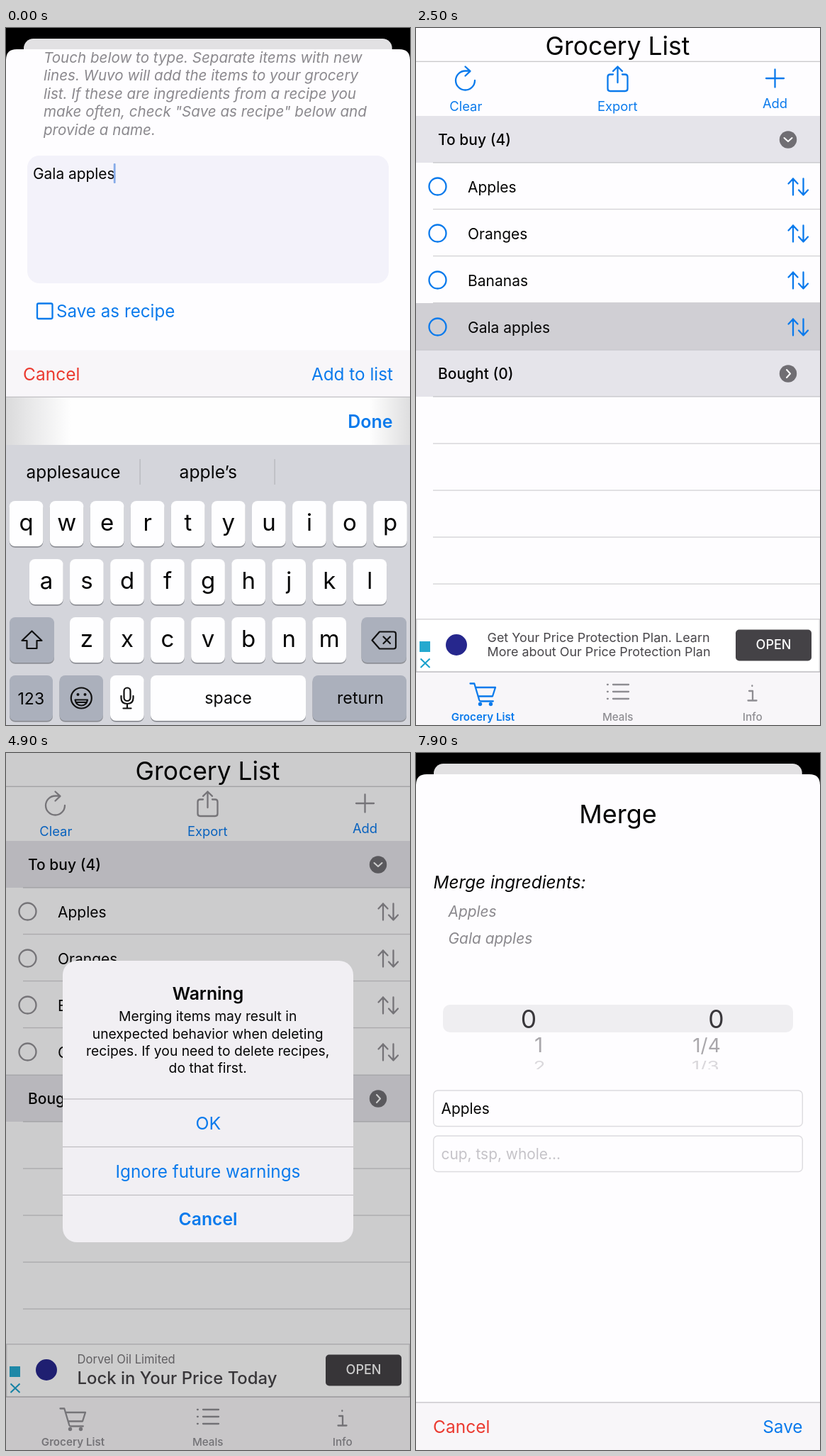
Animation of 570x983 px, one loop 8 s. Source, as an HTML page:

```html
<!DOCTYPE html>
<html lang="en">
<head>
<meta charset="utf-8">
<title>Grocery list</title>
<style>
html, body { margin: 0; width: 100%; height: 100%; overflow: hidden; background: #000; }
svg { display: block; width: 100vw; height: 100vh; font-family: Inter, "Liberation Sans", sans-serif; --tint: #0a7aec; }
text { white-space: pre; }
.ico { fill: none; stroke: var(--tint); stroke-width: 2.3; stroke-linecap: round; stroke-linejoin: round; }
.gray { stroke: #8e8d92; }
.white { stroke: #fff; stroke-width: 2; }
.key { stroke: #111; stroke-width: 2.2; }
</style>
</head>
<body>
<svg id="stage" viewBox="0 0 570 983"></svg>
<script>
const LOOP = 8000, STEP = 100;
const BLUE = '#0a7aec', RED = '#eb3a30', PAPER = '#fefdff', BAR = '#f8f6f9', LINE = '#d3d2d5';

// Markup helpers
const text = (s, x, y, size, fill = '#050505', opt = '') =>
  `<text x="${x}" y="${y}" font-size="${size}" fill="${fill}" ${opt}>${s}</text>`;
const mid = (s, x, y, size, fill, opt = '') => text(s, x, y, size, fill, `text-anchor="middle" ${opt}`);
const right = (s, x, y, size, fill, opt = '') => text(s, x, y, size, fill, `text-anchor="end" ${opt}`);
const rect = (x, y, w, h, fill, r = 0, opt = '') =>
  `<rect x="${x}" y="${y}" width="${w}" height="${h}" fill="${fill}" rx="${r}" ${opt}/>`;
const icon = (d, cls = '') => `<path class="ico ${cls}" d="${d}"/>`;
const group = (id, body, opt = '') => `<g id="${id}" ${opt}>${body}</g>`;
const MEDIUM = 'font-weight="500"', BOLD = 'font-weight="600"', ITALIC = 'font-style="italic"';

// Grocery list screen
const rowBody = (name, y) =>
  `<circle class="ico" cx="30.5" cy="${y}" r="12"/>` +
  text(name, 73, y + 8, 21) +
  icon(`M532 ${y + 12}v-23m-6.5 7l6.5-7 6.5 7M546.5 ${y - 11}v23m-6.5-7l6.5 7 6.5-7`);

const section = (name, y, chevron) =>
  rect(0, y, 570, 66, '#e5e4ea') + rect(24, y + 65.3, 546, 1.2, '#c4c3c8') +
  text(name, 31, y + 41, 21, '#050505', MEDIUM) +
  `<circle cx="525" cy="${y + 33.5}" r="12.2" fill="#706e73"/>` + icon(chevron, 'white');

const toolbar =
  rect(0, 46.6, 570, 1.4, '#cbcacd') +
  mid('Grocery List', 284.5, 38, 35.4) +
  icon('M83 74A13.5 13.5 0 1 1 69.5 60.5H76M69.5 54.5l7 6.3-7 6.7') +
  icon('M278 65.5h-4q-3.5 0-3.5 3.5v16.5q0 3.5 3.5 3.5h21q3.5 0 3.5-3.5V69q0-3.500-3.5-3.5h-4M284.5 77V54.500m-6.5 6.3l6.5-6.3 6.5 6.3') +
  icon('M506.5 58.5v25M494 71h25') +
  mid('Clear', 70.3, 117, 18.4, BLUE) + mid('Export', 284.3, 117, 18.4, BLUE) + mid('Add', 506.5, 112.5, 18.4, BLUE);

const ad =
  rect(0, 833, 570, 75, '#fff') +
  '<path d="M.7 908V833.7H569.3V908" fill="none" stroke="#d6d5d8" stroke-width="1.4"/>' +
  rect(5, 865, 15, 15, '#25a9cf') +
  '<path d="M6.5 889.5l13 12.5m0-12.5l-13 12.5" stroke="#18a0cc" stroke-width="2" fill="none"/>' +
  '<circle cx="57" cy="870" r="15" fill="#26278d"/>' +
  `<g clip-path="url(#adClip)">${
    group('adA', text('Get Your Price Protection Plan. Learn', 100.5, 866, 17.95, '#48464a') +
      text('More about Our Price Protection Plan', 100.5, 886, 17.95, '#48464a'))}${
    group('adB', text('Dorvel Oil Limited', 100.5, 861, 16.6, '#777579') +
      text('Lock in Your Price Today', 100.5, 890, 23.9, '#454347', MEDIUM))}</g>` +
  rect(451, 848.5, 107, 44, '#444246', 5) + mid('OPEN', 504.5, 876, 18, '#fff', MEDIUM);

const tabs =
  rect(0, 908, 570, 75, BAR) + rect(0, 907.4, 570, 1.3, '#b5b4b8') +
  icon('M76.5 924.5h5.8l7 23.5q.5 1.5 2 1.5h17.5M84 930h28l-4 12.5H87.5') +
  '<g fill="var(--tint)"><circle cx="90.5" cy="953.5" r="2.7"/><circle cx="105.5" cy="953.5" r="2.7"/></g>' +
  icon('M278 926h22M278 936h22M278 946h22M270 926h.8M270 936h.8M270 946h.8', 'gray') +
  icon('M470 935h5v13M468.5 948.5h12M474.3 927.5v.5', 'gray') +
  mid('Grocery List', 94.5, 977, 15.2, 'var(--tint)', BOLD) +
  mid('Meals', 284.7, 977, 15.2, '#8e8d92', MEDIUM) + mid('Info', 474.7, 977, 15.2, '#8e8d92', MEDIUM);

const separators = [255.5, 321.5, 387.5, 586, 652, 718, 784]
  .map(y => rect(24, y - .6, 546, 1.3, LINE)).join('');

const preview = group('drag',
  rect(0, 364, 570, 22, 'url(#shadowUp)') + rect(0, 455, 570, 26, 'url(#shadowDown)') +
  rect(0, 387, 570, 68, '#f5f3f7', 0, 'opacity=".84"') + rect(0, 386.5, 570, 4, '#fff') +
  rect(0, 453.4, 570, 2, '#929195') +
  `<g opacity=".86">${rowBody('Gala apples', 421.5)}</g>`);

const list =
  toolbar + separators +
  section('To buy (4)', 124, 'M519.5 155l5.5 5 5.5-5') +
  rowBody('Apples', 223.5) + rowBody('Oranges', 289.5) + rowBody('Bananas', 355.5) +
  rect(0, 388, 570, 66, '#d0cfd4', 0, 'id="press"') +
  group('lifted', rowBody('Gala apples', 421.5)) +
  section('Bought (0)', 454, 'M523 482l5 5.5-5 5.5') + rect(0, 453.6, 570, 1, '#c4c3c8') +
  preview + ad + tabs;

// Warning dialog
const message = ['Merging items may result in', 'unexpected behavior when deleting',
  'recipes. If you need to delete recipes,', 'do that first.'];
const dialog =
  rect(80, 293, 410, 397, '#f1eff3', 20) + rect(80, 488.5, 410, 67, '#dddbe0', 0, 'id="okPress"') +
  mid('Warning', 285, 347.5, 24.8, '#050505', BOLD) +
  message.map((s, i) => mid(s, 284.7, 378.3 + i * 24.3, 19.3)).join('') +
  [488, 555.5, 623.5].map(y => rect(80, y - .6, 410, 1.2, '#bebcc1')).join('') +
  mid('OK', 285.3, 531, 24.8, BLUE) + mid('Ignore future warnings', 285, 598.5, 24.3, BLUE) +
  mid('Cancel', 285, 666, 24.7, BLUE, BOLD);

// Sheets
const sheetBase = `<path d="M0 45Q0 30 15 30H555Q570 30 570 45V1000H0z" fill="${PAPER}"/>`;
const hint = ['Touch below to type. Separate items with new', 'lines. Wuvo will add the items to your grocery',
  'list. If these are ingredients from a recipe you', 'make often, check "Save as recipe" below and', 'provide a name.'];
const addSheet = sheetBase +
  group('form', hint.map((s, i) => text(s, 53, 49 + i * 25.4, 20.6, '#8b898e', ITALIC)).join('') +
    rect(30, 180, 510, 180, '#f3f2fa', 17) + text('Gala apples', 38, 213, 20.9) +
    rect(151.8, 191, 2.8, 28, '#86abe8', 1, 'id="caret"') +
    icon('M46 388.5h17.5q2 0 2 2v17.5q0 2-2 2H46q-2 0-2-2v-17.5q0-2 2-2z') +
    text('Save as recipe', 71, 408, 24.2, BLUE)) +
  rect(0, 454.5, 570, 66, BAR) + rect(0, 519.8, 570, 1.4, '#bfbec2') +
  text('Cancel', 24, 497, 24.5, RED) +
  right('Add to list', 546, 497, 24.3, BLUE, 'id="addTap"');

const field = (y, s, fill) =>
  rect(24.7, y, 520.6, 50.5, '#fefdff', 6, 'stroke="#dcdbdf" stroke-width="1.4"') + text(s, 35.5, y + 33.3, 20.9, fill);
const squash = (s, x, y, size, k, fill) =>
  `<g transform="translate(${x} ${y}) scale(1 ${k})">${mid(s, 0, 0, size, fill)}</g>`;
const mergeSheet = sheetBase +
  mid('Merge', 285, 98.5, 36) + text('Merge ingredients:', 24.5, 190.5, 24.3, '#050505', ITALIC) +
  text('Apples', 45.5, 230.5, 20.9, '#8b898e', ITALIC) + text('Gala apples', 45.5, 268.5, 20.9, '#8b898e', ITALIC) +
  rect(38, 355, 494, 39, '#efeef1', 10) +
  mid('0', 159, 388, 35.5, '#39373b') + mid('0', 423.5, 388, 35.5, '#39373b') +
  squash('1', 173, 422, 30, .95, '#a9a7ab') + squash('1/4', 410, 422, 28, .98, '#a9a7ab') +
  `<g clip-path="url(#wheelClip)">${squash('2', 174, 449, 28, .74, '#dad8dc') + squash('1/3', 408.5, 449, 28, .74, '#dad8dc')}</g>` +
  field(476, 'Apples', '#050505') + field(540, 'cup, tsp, whole...', '#c5c3c8') +
  rect(0, 916, 570, 84, BAR) + rect(0, 915.3, 570, 1.3, '#c3c2c6') +
  text('Cancel', 24, 958.5, 24.5, RED) + right('Save', 545.5, 958.5, 24.3, BLUE);

// Keyboard
const DARK = '#abb0bc';
const cap = (x, y, w, fill = '#fefeff') => rect(x, y + 1.8, w, 64, '#8d8f95', 8) + rect(x, y, w, 64, fill, 8);
const letters = (s, x, y) => [...s].map((c, i) =>
  cap(x + 57.05 * i, y, 47.7) + mid(c, x + 57.05 * i + 23.9, y + 41.5, 33)).join('');
const keyboard =
  rect(0, 521, 570, 67, 'url(#edge)') + right('Done', 545.5, 563.5, 25, BLUE, BOLD) +
  rect(0, 588, 570, 412, '#d4d5db') +
  mid('applesauce', 95, 635, 24.4) + mid('apple’s', 285.3, 635, 24.7) +
  rect(188.5, 608, 1.2, 36, '#b3b4ba') + rect(378.5, 608, 1.2, 36, '#b3b4ba') +
  letters('qwertyuiop', 4.7, 667) + letters('asdfghjkl', 33, 749) + letters('zxcvbnm', 90, 831) +
  cap(5, 831, 63, DARK) + cap(501.5, 831, 63.5, DARK) +
  icon('M36.5 850.5l14 13.5h-7v11h-14v-11h-7z', 'key') +
  icon('M527 851.5h20q3 0 3 3v18q0 3-3 3h-20l-10.5-12zM532.5 858.5l9.5 9.5m0-9.5l-9.5 9.5', 'key') +
  cap(5, 913, 61, DARK) + cap(75.5, 913, 61.5, DARK) + cap(147, 913, 47.7) + cap(204, 913, 219) + cap(432.5, 913, 132.5, DARK) +
  mid('123', 35.3, 953.5, 23) + mid('space', 313.5, 952.5, 23.2) + mid('return', 500, 952.5, 23.2) +
  '<circle class="ico key" cx="106.3" cy="945" r="14.5"/>' + icon('M97.500 947.5h17.5q-1.5 8-8.7 8t-8.8-8zM99.500 951h13.5', 'key') +
  '<circle cx="101.5" cy="940" r="2" fill="#111"/><circle cx="111.5" cy="940" r="2" fill="#111"/>' +
  '<rect class="ico key" x="166.5" y="930.5" width="9" height="18.5" rx="4.5"/>' +
  icon('M162.5 942v3q0 8 8.5 8t8.5-8v-3M171 953v6.5M165.5 959.5h11', 'key');

const shadow = (id, from, to) => `<linearGradient id="${id}" x2="0" y2="1">
  <stop offset="0" stop-opacity="${from}"/><stop offset="1" stop-opacity="${to}"/></linearGradient>`;
const stage = document.getElementById('stage');
stage.innerHTML = `<defs>
  <clipPath id="adClip"><rect x="96" y="835" width="350" height="71"/></clipPath>
  <clipPath id="wheelClip"><rect x="140" y="434" width="300" height="12"/></clipPath>
  <clipPath id="cardClip"><rect id="cardShape" width="570" height="983"/></clipPath>
  <linearGradient id="edge"><stop offset="0" stop-color="#dadadb"/><stop offset=".05" stop-color="#e6e6e7"/>
    <stop offset=".16" stop-color="#fefefe"/><stop offset=".9" stop-color="#fefefe"/><stop offset="1" stop-color="#dededf"/></linearGradient>
  ${shadow('shadowUp', 0, .13)}${shadow('shadowDown', .17, 0)}</defs>` +
  rect(0, 0, 570, 983, '#000') +
  group('card', rect(0, 0, 570, 983, PAPER) + group('list', list) +
    rect(0, 0, 570, 983, '#000', 0, 'id="cardDim"'), 'clip-path="url(#cardClip)"') +
  rect(0, 0, 570, 983, '#000', 0, 'id="shade"') + group('dialog', dialog) +
  group('addSheet', addSheet) + group('mergeSheet', mergeSheet) + group('keys', keyboard);

// Motion
const el = {};
stage.querySelectorAll('[id]').forEach(n => el[n.id] = n);
const set = (id, name, v) => el[id].setAttribute(name, v);
const move = (id, x, y, k = 1) => set(id, 'transform', `translate(${x} ${y}) scale(${k})`);
const fade = (id, v) => { set(id, 'opacity', v); el[id].style.display = v > 0 ? '' : 'none'; };
const ramp = (t, a, b) => Math.min(1, Math.max(0, (t - a) / (b - a)));
const out = p => 1 - (1 - p) ** 3;
const spring = (t, start) => {
  const x = Math.max(0, t - start) * .01826;
  const p = 1 - (1 + x) * Math.exp(-x);
  return p > .9995 ? 1 : p;
};
const track = (t, steps) => {
  let [t0, v0] = steps[0];
  for (const [t1, v1] of steps) {
    if (t < t1) return v0 + (v1 - v0) * ramp(t, t0, t1);
    [t0, v0] = [t1, v1];
  }
  return v0;
};
const blend = (a, b, p) => `rgb(${a.map((v, i) => Math.round(v + (b[i] - v) * p))})`;

const pull = [[2900, 0], [3100, -8], [3400, -72], [3700, -135.5], [3900, -188], [4100, -198]];
const drift = [[2900, 0], [3700, -6], [4050, -6], [4300, 0]];

function render(t) {
  const leave = spring(t, 660), enter = spring(t, 7130);
  const depth = 1 - leave + enter;
  const s = 1 - .088 * depth;
  move('card', Math.floor(285 * (1 - s)), 491.5 * (1 - s) - 28.2 * depth, s);
  move('list', 0, 10 * depth);
  set('cardShape', 'rx', 15 * depth);
  fade('cardDim', .11 * depth);

  move('addSheet', 0, 953 * leave);
  move('form', 0, 80 * leave);
  move('keys', 0, 463 * leave);
  move('mergeSheet', 0, 953 * (1 - enter));
  fade('addSheet', leave < 1 ? 1 : 0);
  fade('keys', leave < 1 ? 1 : 0);
  fade('mergeSheet', enter > 0 ? 1 : 0);
  fade('addTap', t >= 400 && t < 600 ? .35 : 1);
  fade('caret', t < 600 ? 1 : 0);

  // Long press, lift, drag and drop
  fade('press', ramp(t, 2200, 2400) * (1 - ramp(t, 2650, 2850)));
  const k = 1 + .031 * out(ramp(t, 2700, 2950)) * (1 - ramp(t, 4050, 4300));
  move('drag', 285 * (1 - k) + track(t, drift), 421 * (1 - k) + track(t, pull), k);
  fade('drag', ramp(t, 2650, 2800) * (1 - ramp(t, 4100, 4300)));
  fade('lifted', 1 - .52 * ramp(t, 2700, 2900) * (1 - ramp(t, 4050, 4300)));

  const slide = out(ramp(t, 3400, 3870));
  move('adA', -345 * slide, 0);
  move('adB', 345 * (1 - slide), 0);

  const show = out(ramp(t, 4300, 4650)), hide = ramp(t, 6550, 6850);
  const warn = show * (1 - hide), z = 1 + .15 * (1 - show);
  fade('shade', .195 * warn);
  fade('dialog', warn);
  move('dialog', 285 * (1 - z), 491.5 * (1 - z), z);
  fade('okPress', t >= 6400 ? 1 : 0);
  stage.style.setProperty('--tint', blend([10, 122, 236], [146, 144, 149], warn));
}

const begin = performance.now();
function tick() {
  const t = (performance.now() - begin) % LOOP;
  render(Math.floor(t / STEP) * STEP);
  requestAnimationFrame(tick);
}
render(0);
requestAnimationFrame(tick);
</script>
</body>
</html>
```
